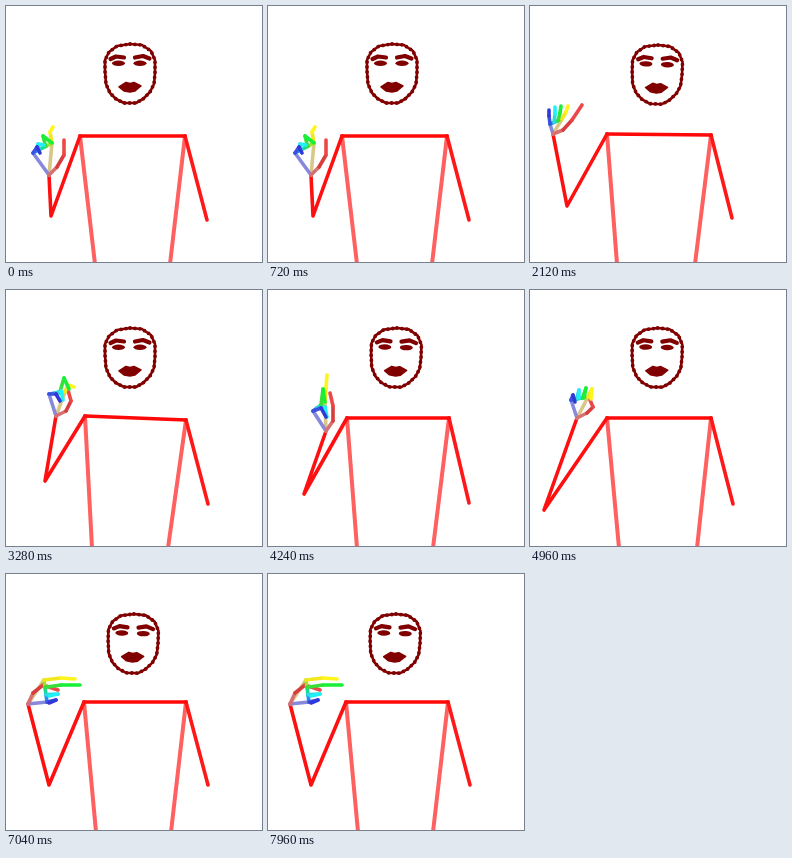
An HTML page with a canvas that plays this animation: 256x256 px, repeating every 8000 ms.

```html
<!DOCTYPE html>
<html lang="en">
<head>
<meta charset="utf-8">
<title>Signing figure</title>
<style>
html, body { margin: 0; width: 100%; height: 100%; overflow: hidden; background: #fff; }
canvas { display: block; width: 100vmin; height: 100vmin; }
</style>
</head>
<body>
<canvas id="stage" width="256" height="256"></canvas>
<script>
const ctx = document.getElementById('stage').getContext('2d');
const LOOP = 8000, STEP = 40;

// torso: shoulders, right elbow, hip x positions; arm: elbow, wrist;
// face: shift x, shift y, tilt; palm: index and little knuckles;
// each finger: middle joint, tip.
const fingerspread = {
  torso: [74, 130, 179, 130, 201, 214, 89, 164], arm: [45, 210, 43, 169], face: [0, 0, 0],
  thumb: [51, 161, 58, 149, 58, 134], palm: [46, 137, 27, 147],
  index: [44, 126, 47, 121], middle: [37, 130, 46, 137], ring: [32, 138, 38, 139], little: [31, 141, 34, 147]
};
const sideways = {
  torso: [77, 129, 180, 129, 202, 212, 90, 165], arm: [42, 208, 22, 134], face: [3, 1, .04],
  thumb: [31, 122, 41, 118, 59, 119], palm: [40, 110, 40, 131],
  index: [55, 109, 70, 110], middle: [56, 116, 73, 115], ring: [53, 121, 44, 124], little: [53, 126, 44, 128]
};
const open = {
  torso: [77, 128, 181, 129, 202, 212, 87, 165], arm: [37, 200, 23, 128], face: [3, 1, .04],
  thumb: [33, 124, 42, 114, 52, 99], palm: [32, 113, 20, 118],
  index: [36, 106, 38, 100], middle: [30, 107, 31, 100], ring: [25, 108, 25, 101], little: [19, 110, 19, 104]
};
const crossed = {
  torso: [79, 126, 180, 130, 202, 214, 86, 162], arm: [39, 191, 50, 126], face: [0, 0, 0],
  thumb: [60, 121, 65, 111, 62, 100], palm: [59, 102, 43, 104],
  index: [62, 95, 68, 97], middle: [58, 88, 63, 99], ring: [55, 101, 57, 110], little: [50, 104, 54, 111]
};
const pointing = {
  torso: [79, 128, 181, 128, 201, 213, 89, 165], arm: [36, 204, 58, 141], face: [4, 0, .03],
  thumb: [65, 131, 65, 116, 62, 103], palm: [57, 112, 45, 121],
  index: [58, 98, 59, 85], middle: [55, 99, 57, 112], ring: [57, 117, 59, 127], little: [53, 118, 58, 127]
};
const fist = {
  torso: [77, 128, 181, 128, 203, 214, 89, 167], arm: [14, 220, 47, 128], face: [3, 0, .02],
  thumb: [57, 123, 63, 117, 60, 110], palm: [58, 107, 41, 110],
  index: [62, 99, 61, 109], middle: [56, 98, 54, 108], ring: [49, 100, 49, 108], little: [43, 105, 45, 112]
};
const sidewaysLow = {
  torso: [78, 128, 180, 128, 202, 211, 90, 165], arm: [43, 211, 22, 130], face: [3, 2, .03],
  thumb: [27, 119, 37, 111, 52, 116], palm: [38, 106, 41, 128],
  index: [55, 104, 69, 105], middle: [55, 111, 74, 111], ring: [52, 120, 43, 122], little: [50, 126, 43, 129]
};

// Moves the forearm and hand sideways, leaving the torso and face alone.
const shifted = (pose, dx) => Object.fromEntries(Object.entries(pose).map(([part, values]) =>
  [part, part === 'torso' || part === 'face' ? values : values.map((v, i) => i % 2 ? v : v + dx)]));

const keys = [
  [0, fingerspread], [720, fingerspread], [1240, sideways], [1520, sideways],
  [2040, open], [2160, open], [2560, shifted(open, -3)], [3120, crossed], [3360, crossed],
  [3920, pointing], [4320, pointing], [4960, fist], [6080, fist],
  [6720, sidewaysLow], [LOOP, sidewaysLow]
];

function poseAt(time) {
  const next = Math.max(1, keys.findIndex(([at]) => at > time));
  const [t0, from] = keys[next - 1], [t1, to] = keys[next];
  const u = (time - t0) / (t1 - t0), ease = u * u * (3 - 2 * u);
  return Object.fromEntries(Object.entries(from).map(([part, values]) =>
    [part, values.map((v, i) => v + (to[part][i] - v) * ease)]));
}

function path(points, close) {
  ctx.beginPath();
  for (let i = 0; i < points.length; i += 2) ctx.lineTo(points[i], points[i + 1]);
  if (close) ctx.closePath();
}

function line(points, color, width = 3.6) {
  path(points);
  ctx.strokeStyle = color;
  ctx.lineWidth = width;
  ctx.stroke();
}

function drawBody({ torso, arm }) {
  const [lx, ly, rx, ry, ex, ey, hipL, hipR] = torso;
  line([lx, ly, hipL, 258], '#ff6060', 4);
  line([rx, ry, hipR, 258], '#ff6060', 4);
  line([rx, ry, ex, ey], '#ff1818');
  line([lx, ly, rx, ry], '#ff0808');
  line([lx, ly, ...arm], '#ff1010');
}

const outline = [124, 38, 136, 39, 145, 45, 149, 54, 149, 67, 148, 78, 144, 86, 137, 93, 130, 97,
  118, 97, 110, 93, 104, 87, 100, 78, 99, 65, 99, 54, 103, 46, 111, 40];
const lips = [113, 81, 120, 76.5, 124, 77.5, 128, 76.5, 135, 80, 129, 85, 124, 86, 118, 85];

function drawFace([dx, dy, tilt]) {
  const dark = '#800000';
  ctx.save();
  ctx.translate(124 + dx, 68 + dy);
  ctx.rotate(tilt);
  ctx.translate(-124, -68);
  ctx.strokeStyle = ctx.fillStyle = dark;
  path(outline, true);
  ctx.lineWidth = 2.6;
  ctx.stroke();
  ctx.setLineDash([0, 5]);
  ctx.lineWidth = 3.8;
  ctx.stroke();
  ctx.setLineDash([]);
  line([104.5, 53, 110, 50.5, 118, 51.5], dark, 4.2);
  line([129, 51.5, 137, 50, 143.5, 52.5], dark, 4.2);
  for (const x of [112.5, 134]) {
    ctx.beginPath();
    ctx.ellipse(x, 57.3, 6.5, 2.7, 0, 0, 2 * Math.PI);
    ctx.fill();
  }
  path(lips, true);
  ctx.fill();
  ctx.lineWidth = 1.5;
  ctx.stroke();
  ctx.restore();
}

const fingers = [
  ['index', '#f2e61c', '#fff51a'],
  ['middle', '#38df38', '#18f038'],
  ['ring', '#30d8e0', '#20f0f8'],
  ['little', '#3c50e0', '#3038d8']
];
const webs = ['#a0e030', '#18dc90', '#2090e8'];

function drawHand(pose) {
  const { palm, thumb, arm } = pose, wrist = arm.slice(2);
  const knuckle = i => [0, 1].map(k => palm[k] + (palm[k + 2] - palm[k]) * i / 3);
  line([...wrist, ...knuckle(0)], '#d8c888');
  line([...wrist, ...knuckle(3)], '#8888dc');
  line([...wrist, ...thumb.slice(0, 2)], '#d87070');
  line(thumb.slice(0, 4), '#d83c3c');
  line(thumb.slice(2), '#ec4848');
  webs.forEach((color, i) => line([...knuckle(i), ...knuckle(i + 1)], color));
  fingers.forEach(([name, low, high], i) => {
    const joints = pose[name];
    line([...knuckle(i), ...joints.slice(0, 2)], low);
    line(joints, high);
  });
}

function draw(time) {
  const pose = poseAt(time);
  ctx.fillStyle = '#fff';
  ctx.fillRect(0, 0, 256, 256);
  ctx.lineCap = ctx.lineJoin = 'round';
  drawBody(pose);
  drawFace(pose.face);
  drawHand(pose);
}

const start = performance.now();
function tick() {
  const time = (performance.now() - start) % LOOP;
  draw(Math.floor(time / STEP) * STEP);
  requestAnimationFrame(tick);
}
tick();
</script>
</body>
</html>
```
